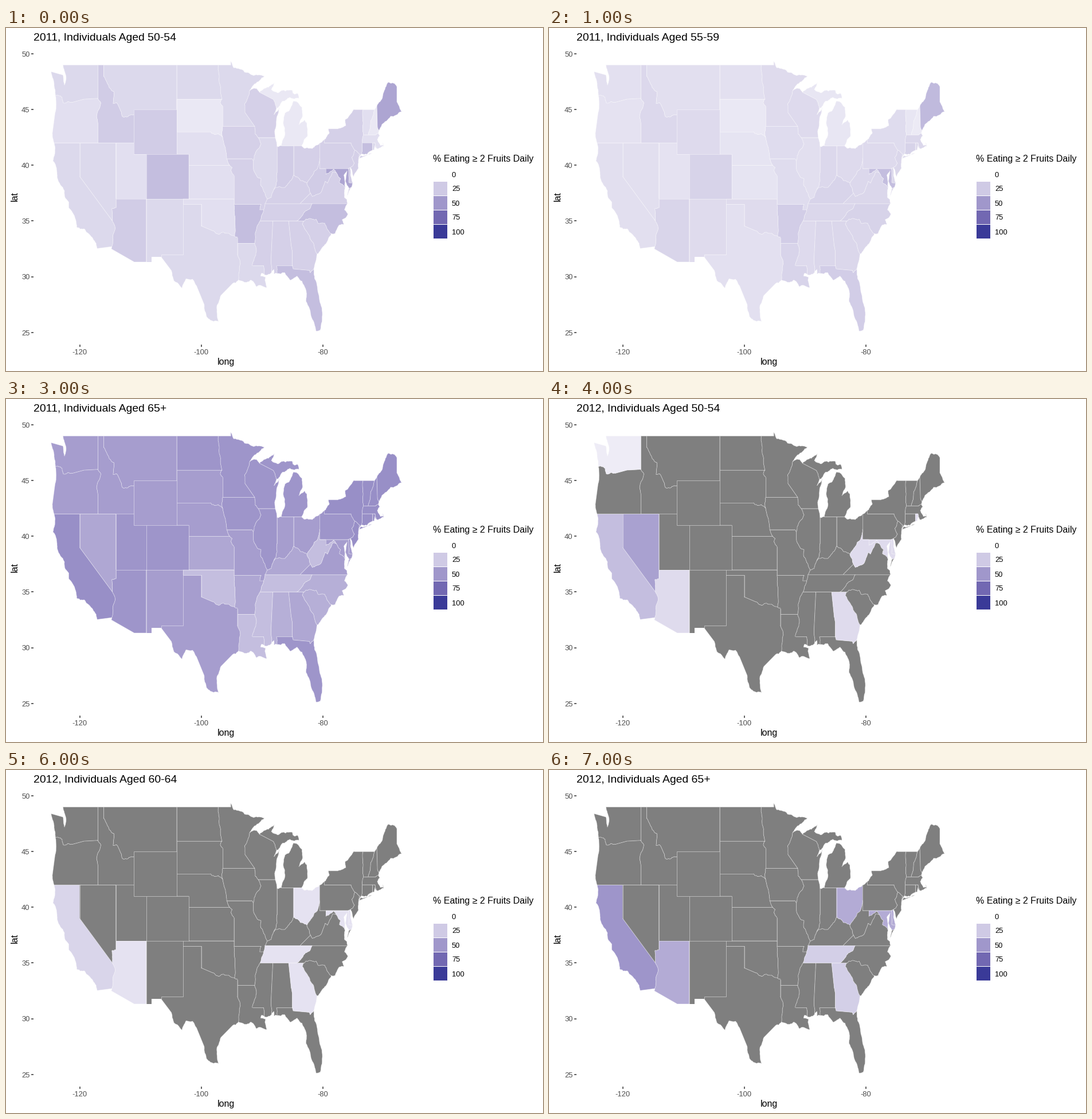
Recreate the animation shown at these times as a matplotlib script. Size 937 px wide and 598 px high, loop 8 s.

```python
import random

import matplotlib.pyplot as plt
from matplotlib.animation import FuncAnimation
from matplotlib.collections import LineCollection, PolyCollection
from matplotlib.colors import LinearSegmentedColormap
from matplotlib.patches import Rectangle

W, H, DPI = 937, 598, 128
PX = 72 / DPI
NO_DATA = "#7F7F7F"
RAMP = ["#FFFFFF", "#CFCAE5", "#A097CB", "#7268B2", "#3A3A98"]
percent = LinearSegmentedColormap.from_list("percent", RAMP)

rng = random.Random(4)
arcs = []


def to_px(west, north):
    return 128.5 + (120 - west) * 10.6, 45 + (50 - north) * 19.43


def wiggle(a, b, depth=3):
    """Points from a to just before b; short diagonal runs become ragged."""
    dx, dy = b[0] - a[0], b[1] - a[1]
    if depth == 0 or dx == 0 or dy == 0 or dx * dx + dy * dy > 3.6:
        return [a]
    k = rng.uniform(-0.11, 0.11)
    mid = ((a[0] + b[0]) / 2 - dy * k, (a[1] + b[1]) / 2 + dx * k)
    return wiggle(a, mid, depth - 1) + wiggle(mid, b, depth - 1)


def arc(owners, *nums):
    """A border shared by the named states, through west/north key points."""
    pts = list(zip(nums[::2], nums[1::2]))
    line = [p for a, b in zip(pts, pts[1:]) for p in wiggle(a, b)]
    arcs.append((owners.split(), line + [pts[-1]]))


def parallel(north, *legs):
    """Borders along one latitude: west, owners, west, owners, west ..."""
    for start, owners, end in zip(legs[::2], legs[1::2], legs[2::2]):
        arc(owners, start, north, end, north)


def meridian(west, *legs):
    """Borders along one longitude: north, owners, north ..."""
    for start, owners, end in zip(legs[::2], legs[1::2], legs[2::2]):
        arc(owners, west, start, west, end)


def rings(state):
    """Join a state's borders end to end into closed outlines."""
    todo = [line for owners, line in arcs if state in owners]
    found = []
    while todo:
        ring = list(todo.pop(0))
        while ring[0] != ring[-1]:
            for line in todo:
                if ring[-1] in (line[0], line[-1]):
                    break
            else:
                break
            todo.remove(line)
            ring += line[1:] if line[0] == ring[-1] else line[-2::-1]
        found.append(ring)
    return found


# Surveyed borders
parallel(49, 122.75, "WA", 117, "ID", 116.05, "MT", 104.05, "ND", 97.2, "MN", 95.15)
parallel(45.94, 104.05, "ND SD", 96.6)
parallel(45, 111.05, "MT WY", 104.05)
parallel(45, 74.9, "NY", 73.35, "VT", 71.5)
parallel(43.5, 96.45, "MN IA", 91.2)
parallel(43, 104.05, "SD NE", 98.5)
parallel(42.73, 73.3, "VT MA", 72.5, "NH MA", 71.3)
parallel(42.5, 90.65, "WI IL", 87.8)
parallel(42.03, 73.5, "MA CT", 71.8, "MA RI", 71.4)
parallel(42, 124.2, "OR CA", 120, "OR NV", 117, "ID NV", 114.05, "ID UT", 111.05)
parallel(42, 79.76, "PA NY", 75.35)
parallel(41.75, 86.8, "IN MI", 84.8, "OH MI", 83.45)
parallel(41, 111.05, "WY UT", 109.05, "WY CO", 104.05, "NE CO", 102.05)
parallel(40.6, 95.8, "IA MO", 91.7)
parallel(40, 102.05, "NE KS", 95.3)
parallel(39.72, 80.52, "WV PA", 79.48, "MD PA", 75.79)
parallel(37, 114.05, "UT AZ", 109.05, "CO NM", 103, "CO OK", 102.05, "KS OK", 94.6)
parallel(36.57, 89.5, "KY TN", 83.7, "VA TN", 81.7, "VA NC", 75.9)
parallel(36.5, 103, "TX OK", 100)
parallel(36.5, 94.6, "MO AR", 90.15)
parallel(35, 90.3, "TN MS", 88.2, "TN AL", 85.6, "TN GA", 84.3, "NC GA", 83.1)
parallel(33, 94.05, "AR LA", 91.2)
parallel(32, 106.6, "NM TX", 103)
parallel(31.78, 108.2, "NM", 106.6)
parallel(31.33, 111.05, "AZ", 109.05, "NM", 108.2)
parallel(31, 91.6, "LA MS", 89.75)
parallel(31, 87.6, "AL FL", 85)

meridian(120, 42, "CA NV", 39)
meridian(117, 49, "WA ID", 46)
meridian(117, 43.8, "OR ID", 42)
meridian(116.05, 49, "ID MT", 48)
meridian(114.05, 42, "NV UT", 37, "NV AZ", 36.2)
meridian(111.05, 45, "MT WY", 44.5, "ID WY", 42, "WY UT", 41)
meridian(109.05, 41, "UT CO", 37, "AZ NM", 31.33)
meridian(108.2, 31.78, "NM", 31.33)
meridian(106.6, 32, "NM TX", 31.78)
meridian(104.05, 49, "MT ND", 45.94, "MT SD", 45, "WY SD", 43, "WY NE", 41)
meridian(103, 37, "NM OK", 36.5, "NM TX", 32)
meridian(102.05, 41, "NE CO", 40, "CO KS", 37)
meridian(100, 36.5, "TX OK", 34.56)
meridian(96.45, 45.3, "SD MN", 43.5)
meridian(95.15, 49, "MN", 49.35)
meridian(94.6, 39.1, "KS MO", 37, "MO OK", 36.5)
meridian(94.05, 33.55, "TX AR", 33, "TX LA", 32)
meridian(87.53, 41.7, "IL IN", 39.35)
meridian(84.8, 41.75, "IN OH", 39.1)
meridian(80.52, 42, "OH PA", 40.64, "WV PA", 39.72)
meridian(79.76, 42.27, "PA NY", 42)
meridian(79.48, 39.72, "WV MD", 39.2)
meridian(73.5, 42.03, "NY CT", 41.3)
meridian(71.8, 42.03, "CT RI", 41.35)
meridian(67.8, 47.07, "ME", 45.7)

# Rivers and ridges
arc("CA NV", 120, 39, 114.6, 35)
arc("WA OR", 124, 46.25, 122.9, 46.1, 122.7, 45.6, 121.2, 45.65, 119.3, 45.93, 117, 46)
arc("OR ID", 117, 46, 116.5, 45.6, 117.2, 44.4, 117, 43.8)
arc("ID MT", 116.05, 48, 114.75, 46.7, 114.35, 46.6, 114.5, 45.55, 113.9, 45.6,
    113, 44.4, 111.5, 44.55, 111.05, 44.5)
arc("CA AZ", 114.6, 35, 114.15, 34.3, 114.55, 33.5, 114.7, 32.7)
arc("NV AZ", 114.05, 36.2, 114.7, 36.1, 114.6, 35)
arc("ND MN", 97.2, 49, 97.1, 48.2, 96.8, 47, 96.6, 45.94)
arc("SD MN", 96.6, 45.94, 96.85, 45.6, 96.45, 45.3)
arc("SD IA", 96.45, 43.5, 96.6, 43, 96.45, 42.5)
arc("SD NE", 98.5, 43, 97.9, 42.8, 97.2, 42.85, 96.45, 42.5)
arc("NE IA", 96.45, 42.5, 95.9, 41.2, 95.8, 40.6)
arc("NE MO", 95.8, 40.6, 95.3, 40)
arc("KS MO", 95.3, 40, 94.9, 39.8, 95.1, 39.5, 94.6, 39.1)
arc("TX OK", 100, 34.56, 98.1, 34.12, 97.1, 33.8, 95.5, 33.9, 94.48, 33.64)
arc("TX AR", 94.48, 33.64, 94.05, 33.55)
arc("OK AR", 94.6, 36.5, 94.43, 35.4, 94.48, 33.64)
arc("TX LA", 94.05, 32, 93.55, 31.15, 93.75, 30.4, 93.85, 29.7)
arc("MN WI", 91.2, 43.5, 92.8, 44.75, 92.85, 45.5, 92.3, 46.1, 92, 46.7)
arc("IA WI", 91.2, 43.5, 91.1, 42.8, 90.65, 42.5)
arc("IA IL", 90.65, 42.5, 90.15, 41.9, 91, 41.2, 91.4, 40.4)
arc("IA MO", 91.7, 40.6, 91.4, 40.4)
arc("MO IL", 91.4, 40.4, 91.4, 39.7, 90.7, 38.9, 90.15, 38.8, 90.2, 38.2,
    89.5, 37.5, 89.15, 37)
arc("MO KY", 89.5, 36.57, 89.15, 37)
arc("MO TN", 89.7, 36, 89.5, 36.57)
arc("MO AR", 90.15, 36.5, 90.35, 36, 89.7, 36)
arc("AR TN", 90.3, 35, 89.7, 36)
arc("AR MS", 91.2, 33, 91.1, 33.9, 90.3, 35)
arc("LA MS", 91.2, 33, 90.9, 32.3, 91.6, 31)
arc("LA MS", 89.75, 31, 89.6, 30.2)
arc("WI MI", 90.4, 46.55, 88.1, 45.9, 87.6, 45.1)
arc("IL IN", 87.53, 39.35, 87.5, 38.6, 88.05, 37.8)
arc("IL KY", 88.05, 37.8, 88.5, 37.1, 89.15, 37)
arc("IN KY", 84.8, 39.1, 85.6, 38.4, 86.3, 38, 88.05, 37.8)
arc("OH KY", 84.8, 39.1, 83.7, 38.65, 82.6, 38.4)
arc("KY WV", 82.6, 38.4, 82, 37.5)
arc("KY VA", 82, 37.5, 83.7, 36.57)
arc("TN NC", 81.7, 36.57, 82.1, 36.1, 83.1, 35.75, 84.3, 35)
arc("GA AL", 85.6, 35, 85.2, 32.9, 85, 32.2, 85, 31)
arc("AL FL", 87.6, 31, 87.5, 30.3)
arc("GA FL", 85, 31, 84.86, 30.7, 82.2, 30.57, 82.05, 30.36, 81.45, 30.7)
arc("AL MS", 88.2, 35, 88.47, 31.9, 88.4, 30.37)
arc("GA SC", 80.9, 32.05, 81.5, 33, 82.5, 33.95, 83.35, 34.7, 83.1, 35)
arc("SC NC", 83.1, 35, 82.3, 35.2, 81.05, 35.15, 80.8, 34.82, 79.67, 34.8, 78.55, 33.86)
arc("VA MD", 76.3, 37.95, 77.25, 38.45, 77.04, 38.8, 77.72, 39.32)
arc("VA MD", 75.25, 38.03, 75.65, 37.95)
arc("VA WV", 77.72, 39.32, 78.35, 39.4, 79.2, 38.4, 79.6, 38.55, 80.3, 37.55,
    81.7, 37.2, 82, 37.5)
arc("WV MD", 77.72, 39.32, 78.2, 39.65, 79.48, 39.2)
arc("WV OH", 80.52, 40.64, 80.85, 39.7, 81.8, 39, 82.6, 38.4)
arc("MD DE", 75.79, 39.72, 75.7, 38.46, 75.05, 38.45)
arc("DE PA", 75.42, 39.8, 75.79, 39.72)
arc("PA NY", 75.35, 42, 74.7, 41.36)
arc("PA NJ", 74.7, 41.36, 75.2, 40.7, 74.75, 40.2, 75.42, 39.8)
arc("NJ NY", 74.7, 41.36, 73.9, 41, 74.03, 40.7)
arc("NY VT", 73.35, 45, 73.4, 44, 73.3, 42.73)
arc("NY MA", 73.3, 42.73, 73.5, 42.03)
arc("NY CT", 73.5, 41.3, 73.65, 41)
arc("VT NH", 71.5, 45, 72.1, 44, 72.5, 42.73)
arc("NH MA", 71.3, 42.73, 70.82, 42.87)
arc("NH ME", 71.08, 45.3, 70.98, 43.4, 70.72, 43.08)
arc("MA RI", 71.12, 41.5, 71.4, 42.03)

# Coasts, lakes and outer borders
arc("WA", 124, 46.25, 124.2, 47.3, 124.7, 48.4, 122.75, 48.1, 122.5, 47.2,
    122.25, 48, 122.75, 49)
arc("OR", 124, 46.25, 124.05, 44.7, 124.5, 42.85, 124.2, 42)
arc("CA", 124.2, 42, 124.1, 41, 124.4, 40.4, 123.8, 39.7, 123.7, 38.9, 122.5, 37.7,
    122.4, 37.1, 121.8, 36.7, 121.8, 36.2, 120.65, 35.1, 120.5, 34.45, 119.3, 34.3,
    118.4, 33.8, 117.3, 33, 117.1, 32.53, 114.7, 32.7)
arc("AZ", 114.7, 32.7, 114.8, 32.5, 111.05, 31.33)
arc("TX", 93.85, 29.7, 94.8, 29.4, 96.6, 28.4, 97.4, 27.4, 97.15, 25.95, 98.2, 26.05,
    99.1, 26.4, 99.5, 27.5, 100.7, 29.1, 101.4, 29.77, 102.5, 29.8, 103.15, 28.98,
    104.5, 29.65, 104.9, 30.55, 106.6, 31.78)
arc("LA", 93.85, 29.7, 92.3, 29.55, 91.8, 29.7, 90.9, 29.1, 90.1, 29.2, 89.2, 29,
    89.5, 29.7, 89.4, 30, 90.2, 30.05, 90.1, 30.3, 89.6, 30.2)
arc("MS", 88.4, 30.37, 89.6, 30.2)
arc("AL", 87.5, 30.3, 88, 30.25, 88.02, 30.65, 88.4, 30.37)
arc("FL", 87.5, 30.3, 86.3, 30.38, 85.3, 29.68, 84.2, 30.05, 83.4, 29.6, 82.7, 28.7,
    82.75, 27.8, 81.8, 26.3, 81.1, 25.15, 80.4, 25.2, 80.05, 26.8, 80.6, 28.3,
    81.3, 29.8, 81.45, 30.7)
arc("GA", 81.45, 30.7, 80.9, 32.05)
arc("SC", 80.9, 32.05, 80, 32.65, 79.3, 33.1, 78.55, 33.86)
arc("NC", 78.55, 33.86, 77.95, 33.87, 77.2, 34.65, 76.5, 34.7, 76.8, 35.1,
    75.85, 35.6, 76.4, 36, 75.9, 36.57)
arc("VA", 75.9, 36.57, 76, 36.92, 76.4, 37.1, 76.3, 37.95)
arc("VA", 75.25, 38.03, 75.95, 37.13, 75.65, 37.95)
arc("MD", 75.05, 38.45, 75.25, 38.03)
arc("MD", 75.65, 37.95, 76.25, 38.6, 76, 39.5, 76.5, 39.1, 76.3, 37.95)
arc("DE", 75.42, 39.8, 75.4, 39.1, 75.05, 38.45)
arc("NJ", 74.03, 40.7, 74.1, 39.75, 74.9, 38.95, 75.42, 39.8)
arc("NY", 73.65, 41, 74.03, 40.7)
arc("NY", 74, 40.6, 73.7, 40.87, 72.3, 41.05, 71.9, 41.07, 74, 40.6)
arc("NY", 79.76, 42.27, 78.9, 42.9, 79.05, 43.27, 77.5, 43.27, 76.2, 43.55,
    76.3, 44.1, 74.9, 45)
arc("CT", 71.8, 41.35, 73.65, 41)
arc("RI", 71.8, 41.35, 71.5, 41.37, 71.4, 41.75, 71.12, 41.5)
arc("MA", 70.82, 42.87, 70.6, 42.65, 71, 42.3, 70.5, 41.78, 70.05, 41.8,
    70.1, 42.05, 69.95, 41.7, 71.12, 41.5)
arc("NH", 71.5, 45, 71.08, 45.3)
arc("NH", 70.72, 43.08, 70.82, 42.87)
arc("ME", 71.08, 45.3, 70.3, 45.9, 70.05, 46.42, 69.2, 47.45, 68.3, 47.36, 67.8, 47.07)
arc("ME", 67.8, 45.7, 67.4, 45.3, 67, 44.8, 68.8, 44.4, 70.25, 43.65, 70.72, 43.08)
arc("PA", 80.52, 42, 79.76, 42.27)
arc("OH", 80.52, 42, 81.7, 41.5, 83, 41.52, 83.45, 41.75)
arc("IN", 87.53, 41.7, 86.8, 41.75)
arc("IL", 87.8, 42.5, 87.53, 41.7)
arc("WI", 87.6, 45.1, 88, 44.55, 87.1, 45.2, 87.5, 44.4, 87.9, 43, 87.8, 42.5)
arc("WI", 92, 46.7, 90.9, 46.9, 90.4, 46.55)
arc("MI", 83.45, 41.75, 83.1, 42.2, 82.5, 42.6, 82.6, 43.8, 83, 44.07, 83.9, 43.65,
    83.3, 44.4, 83.4, 45.2, 84.75, 45.78, 85.5, 44.9, 86.2, 44.7, 86.5, 43.8,
    86.2, 42.8, 86.8, 41.75)
arc("MI", 90.4, 46.55, 88.9, 47, 87.9, 47.48, 88.45, 46.8, 87.4, 46.5, 86.1, 46.65,
    85, 46.75, 84.9, 46.48, 84.1, 46.45, 83.9, 46, 85.4, 46.1, 86.6, 45.75, 87.6, 45.1)
arc("MN", 95.15, 49.35, 94.65, 48.75, 93.3, 48.6, 92.2, 48.3, 91.4, 48.05, 89.6, 48,
    91.2, 47.3, 92, 46.7)

STATES = sorted({s for owners, _ in arcs for s in owners})


def survey(default, **groups):
    """Percent per state; a keyword such as p31 lists the states at 31 %."""
    values = dict.fromkeys(STATES, default)
    for key, names in groups.items():
        values.update(dict.fromkeys(names.split(), int(key[1:])))
    return values


a50 = survey(22, p11="SD MI NH", p15="OR NE KS VT UT OK MA",
             p18="CA NV NM ND MN RI TX WA MT IL LA", p24="ID WY AZ IN WV DE",
             p31="AR CT FL NC CO", p43="MD ME")
a60 = survey(13, p9="NH VT", p11="WA WY SD ND NE CO IA TX NC KS MO NY CT",
             p16="AZ AR GA SC AL RI NM MN VA FL TN NJ", p19="KY OK MD", p23="MA ME LA")
a55 = {s: (a50[s] + a60[s]) / 2 for s in STATES}
a65 = survey(47, p31="LA MS TN WV OK", p38="AL SC NC", p42="AR KY GA KS NV",
             p51="FL RI UT CO ND MN WI PA MI IA IL AZ",
             p54="NJ NH ME NY CT MA CA VT")
b50 = survey(None, p9="WA", p17="AZ GA WV MD DE RI", p31="CA", p45="NV")
b55 = survey(14, p8="AZ NM MN WI TN", p11="MS NY",
             p18="CA CO SC VA NJ DE IA NC WV VT MD TX MA RI", p26="NV")
b55.update(dict.fromkeys("WA ID MT NE KS MO IL IN KY ME".split()))
b60 = survey(None, p14="AZ GA OH TN MD DE", p20="CA")
b65 = survey(None, p23="TN GA", p40="OH MD DE AZ", p51="CA")

SURVEYS = [a50, a55, a60, a65, b50, b55, b60, b65]
AGES = ["50-54", "55-59", "60-64", "65+"]

plt.rcParams["font.family"] = "Liberation Sans"
fig = plt.figure(figsize=(W / DPI, H / DPI), dpi=DPI, facecolor="white")
ax = fig.add_axes([0, 0, 1, 1])
ax.set_xlim(0, W)
ax.set_ylim(H, 0)
ax.axis("off")


def label(x, y, s, size, color="black", ha="left", **kw):
    return ax.text(x, y, s, fontsize=size * PX, color=color, ha=ha, va="baseline", **kw)


def tick(x, y):
    ax.plot(x, y, color="#333333", lw=1.5 * PX, solid_capstyle="butt")


shapes = [(s, [to_px(*p) for p in ring]) for s in STATES for ring in rings(s)]
land = PolyCollection([pts for _, pts in shapes], edgecolors="none")
ax.add_collection(land, autolim=False)
ax.add_collection(LineCollection([[to_px(*p) for p in line] for _, line in arcs],
                                 colors="white", linewidths=0.9 * PX, alpha=0.48),
                  autolim=False)

for north in range(25, 51, 5):
    y = to_px(0, north)[1]
    tick([44.3, 48.3], [y, y])
    label(41.5, y + 4.8, str(north), 12.9, "#4D4D4D", "right")
for west in (120, 100, 80):
    x = to_px(west, 0)[0]
    tick([x, x], [551.5, 555.5])
    label(x, 568.8, f"-{west}", 12.9, "#4D4D4D", "center")
label(384.5, 587, "long", 16, ha="center")
label(19.5, 293, "lat", 16, ha="center", rotation=90, rotation_mode="anchor")

label(745, 232.7, "% Eating ≥ 2 Fruits Daily", 16)
for i, color in enumerate(RAMP):
    y = 242.3 + 25 * i
    ax.add_patch(Rectangle((745.3, y), 24.7, 25, fc=color, ec="white", lw=PX))
    label(778, y + 17.2, str(25 * i), 12.9)

title = label(48.3, 22.3, "", 19.4)


def draw(i):
    values = SURVEYS[i]
    land.set_facecolor([NO_DATA if values[s] is None else percent(values[s] / 100)
                        for s, _ in shapes])
    title.set_text(f"{2011 + i // 4}, Individuals Aged {AGES[i % 4]}")
    return land, title


anim = FuncAnimation(fig, draw, frames=8, interval=1000, repeat=True, repeat_delay=0)
plt.show()
```
